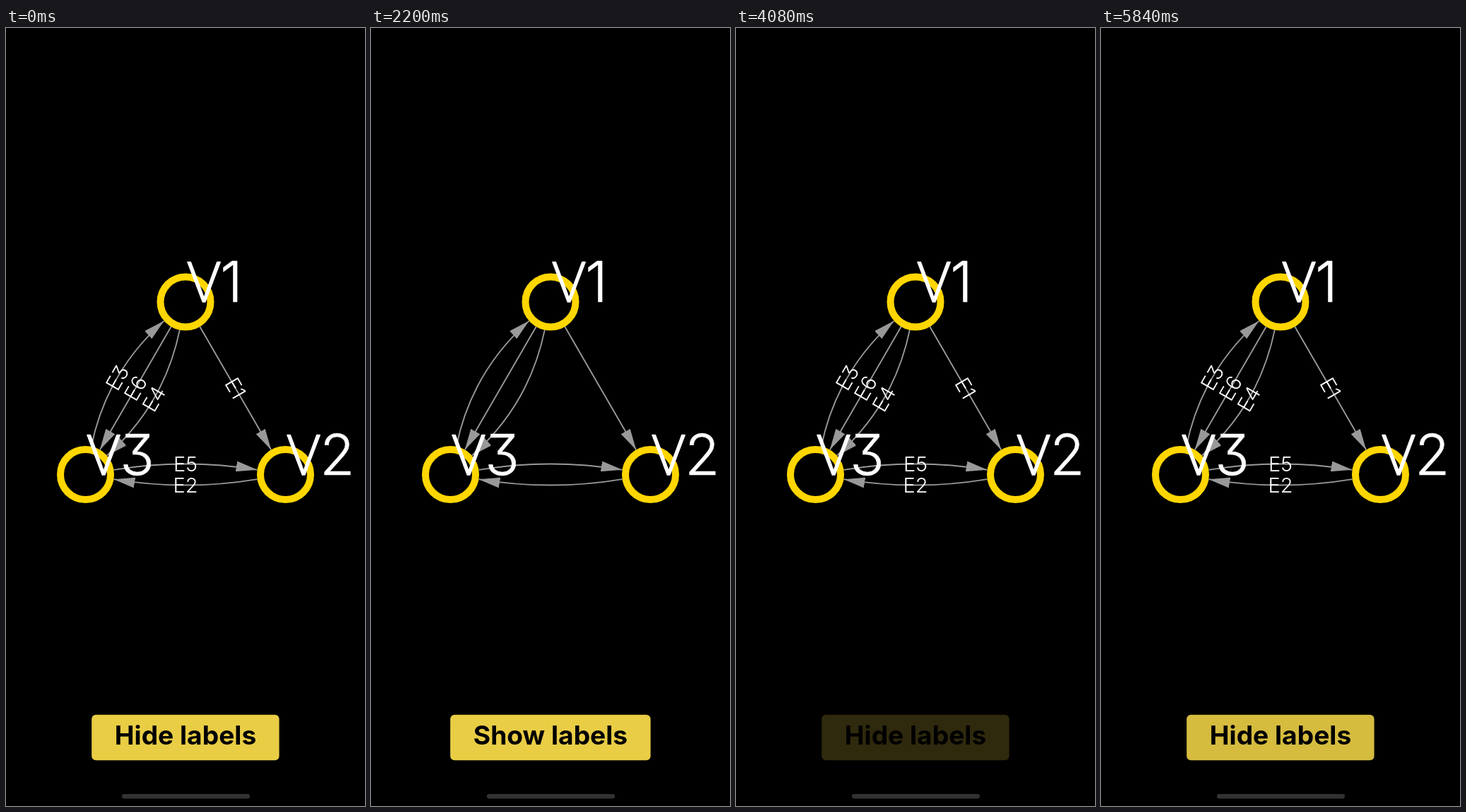
Animation, 508 px wide and 1102 px high, one loop 5.95 s. Source, as an HTML page:

```html
<!DOCTYPE html>
<html lang="en">
<head>
<meta charset="utf-8">
<title>Graph labels</title>
<style>
  html, body { margin: 0; width: 100%; height: 100%; overflow: hidden; background: #000; }
  svg { display: block; width: 508px; height: 1102px; }

  .edges path { fill: none; stroke: #999; stroke-width: 1.9; marker-end: url(#arrow); }
  .nodes circle { fill: #000; stroke: #ffd600; stroke-width: 10; }
  text { font-family: Inter, Roboto, sans-serif; }
  .names, .tags { fill: #fff; font-weight: 300; font-feature-settings: "cv09"; }
  .names { font-size: 80px; stroke: #fff; stroke-width: .6; stroke-linejoin: round; }
  .names .v { font-family: "Open Sans", "Noto Sans", sans-serif; stroke-width: 1.6; }
  .tags { font-size: 29px; text-anchor: middle; }
  .button rect { fill: #e9cd45; }
  .button text { font-size: 37.2px; font-weight: 650; text-anchor: middle; }

  .on, .off, .press { animation: 5950ms step-end infinite; }
  .on { animation-name: on; }
  .off { animation-name: off; }
  .press { animation-name: press; }

  /* labels toggle at 1870, 3090, 4300 and 5620 ms */
  @keyframes on {
    0% { visibility: visible; }
    31.429% { visibility: hidden; }
    51.933% { visibility: visible; }
    72.269% { visibility: hidden; }
    94.454%, 100% { visibility: visible; }
  }
  @keyframes off {
    0% { visibility: hidden; }
    31.429% { visibility: visible; }
    51.933% { visibility: hidden; }
    72.269% { visibility: visible; }
    94.454%, 100% { visibility: hidden; }
  }
  /* four taps: drop to 0.2, then fade back in 110 ms steps */
  @keyframes press {
    0% { opacity: 1; }
    29.580% { opacity: .2; }
    33.277% { opacity: .24; }
    35.126% { opacity: .75; }
    36.975% { opacity: 1; }
    48.235% { opacity: .2; }
    53.782% { opacity: .22; }
    55.630% { opacity: .68; }
    68.571% { opacity: .2; }
    74.118% { opacity: .36; }
    92.605% { opacity: .2; }
    96.303% { opacity: .36; }
    98.151% { opacity: .92; }
    100% { opacity: 1; }
  }
</style>
</head>
<body>
<svg viewBox="0 0 508 1102">
  <defs>
    <marker id="arrow" markerUnits="userSpaceOnUse" markerWidth="30" markerHeight="15"
            refX="30" refY="7.5" orient="auto">
      <path d="M0 0L30 7.5L0 15Z" style="fill:#999;stroke:none;marker-end:none"/>
    </marker>
  </defs>

  <g class="edges"></g>

  <g class="nodes">
    <circle cx="254" cy="388" r="35.5"/>
    <circle cx="395.5" cy="632.5" r="35.5"/>
    <circle cx="112.5" cy="632.5" r="35.5"/>
  </g>

  <g class="tags on"></g>

  <g class="names">
    <text x="257" y="388"><tspan class="v">V</tspan>1</text>
    <text x="398" y="633"><tspan class="v">V</tspan>2</text>
    <text x="115" y="633"><tspan class="v">V</tspan>3</text>
  </g>

  <g class="button press">
    <g class="on">
      <rect x="121.2" y="972.8" width="265.4" height="64.5" rx="6"/>
      <text x="254" y="1015">Hide labels</text>
    </g>
    <g class="off">
      <rect x="112.2" y="972.8" width="283.4" height="64.5" rx="6"/>
      <text x="254" y="1015">Show labels</text>
    </g>
  </g>

  <rect x="164" y="1085" width="181" height="6.5" rx="3.2" fill="#323232"/>
</svg>
<script>
  const V1 = [254, 388], V2 = [395.5, 632.5], V3 = [112.5, 632.5];
  const R = 40.5;

  function add(parent, tag, attrs, text = '') {
    const el = document.createElementNS('http://www.w3.org/2000/svg', tag);
    for (const k in attrs) el.setAttribute(k, attrs[k]);
    el.textContent = text;
    document.querySelector(parent).append(el);
  }

  // point on the node's rim that faces p
  function rim([x, y], [px, py]) {
    const d = Math.hypot(px - x, py - y);
    return [x + (px - x) * R / d, y + (py - y) * R / d];
  }

  // bend moves the control point to the left of the direction of travel
  function edge(name, a, b, bend, angle) {
    const dx = b[0] - a[0], dy = b[1] - a[1], d = Math.hypot(dx, dy);
    const c = [(a[0] + b[0]) / 2 + bend * dy / d, (a[1] + b[1]) / 2 - bend * dx / d];
    const s = rim(a, c), e = rim(b, c);
    const [x, y] = c.map((v, i) => (s[i] + 2 * v + e[i]) / 4);
    add('.edges', 'path', { d: `M${s}Q${c} ${e}` });
    add('.tags', 'text', { transform: `translate(${x} ${y}) rotate(${angle})`, dy: '.364em' }, name);
  }

  edge('E1', V1, V2, 0, 60);
  edge('E2', V2, V3, 23.5, 0);
  edge('E3', V3, V1, 47, -60);
  edge('E4', V1, V3, 47, -60);
  edge('E5', V3, V2, 23.5, 0);
  edge('E6', V1, V3, 0, -60);
</script>
</body>
</html>
```
